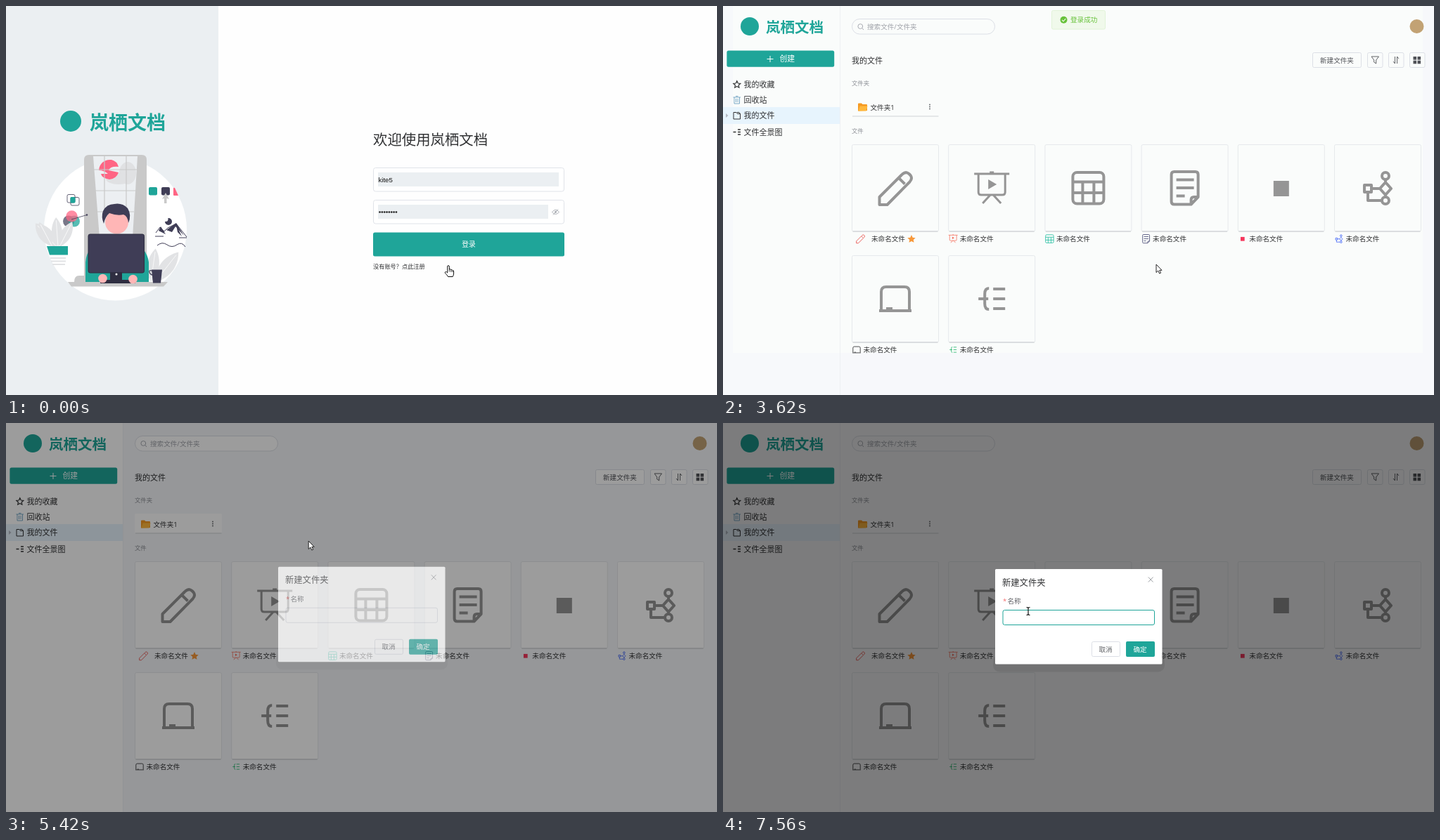
These frames come from a looping animation (1011x554 px, 7.99 s). An HTML page:

```html
<!DOCTYPE html>
<html lang="zh-CN">
<head>
<meta charset="utf-8">
<title>文档</title>
<style>
html, body { margin: 0; width: 100%; height: 100%; overflow: hidden; background: #fff; }
svg { display: block; width: 1011px; height: 554px; }
text { font-family: 'Open Sans', 'Noto Sans CJK SC', 'Noto Sans CJK', sans-serif; white-space: pre; }
.edge { fill: var(--edge); }
.page { fill: var(--page); }
.side { fill: var(--side); }
.card { fill: var(--card); }
</style>
</head>
<body>
<svg id="stage" viewBox="0 0 1011 554" xmlns="http://www.w3.org/2000/svg"></svg>
<script>
const LOOP = 7990;
const TEAL = '#1fa599', INK = '#303133', DARK = '#3f3d56', GREY = '#959595';
const BRAND = '岚栖文档';

// ---- markup helpers ----
const rect = (x, y, w, h, fill, more = '') =>
  `<rect x="${x}" y="${y}" width="${w}" height="${h}" fill="${fill}" ${more}/>`;
const box = (x, y, w, h, fill, line, r = 2) =>
  rect(x, y, w, h, fill, `stroke="${line}" rx="${r}"`);
const disc = (x, y, r, fill, more = '') => `<circle cx="${x}" cy="${y}" r="${r}" fill="${fill}" ${more}/>`;
const shape = (d, fill, more = '') => `<path d="${d}" fill="${fill}" ${more}/>`;
const line = (d, color, w = 1, more = '') =>
  `<path d="${d}" fill="none" stroke="${color}" stroke-width="${w}" ${more}/>`;
// y is the middle of the glyphs
const label = (x, y, s, size, fill = INK, more = '') =>
  `<text x="${x}" y="${y + size * 0.37}" font-size="${size}" fill="${fill}" ${more}>${s}</text>`;

// ---- file type icons, about 48 units wide around 0,0 ----
const GLYPHS = {
  pen: '<path d="M-22.5 24V13L9-18.500Q14.500-24.500 19.500-20L21.500-18Q25-13.500 20.500-8.500L-11.500 24Z M6-13L13.500-5.500"/>',
  slides: '<path stroke-width="3" d="M-25-20H25 M-19-20V6q0 4 4 4H15q4 0 4-4V-20 M-2 10L-13 22 M2 10L13 22 M-3-22H3"/>' +
    '<path stroke="none" fill="currentColor" d="M-5-12L7-5L-5 2Z"/>',
  sheet: '<rect x="-22" y="-22" width="44" height="44.5" rx="6"/><path d="M-22-8.500H22 M-22 7H22 M-8-8V22 M8-8V22"/>',
  doc: '<path d="M-15-23H15q4 0 4 4V13L9 23.500H-15q-4 0-4-4V-19q0-4 4-4Z M9 23V17q0-4 4-4H19 M-12-11.500H13 M-12 0H13 M-12 11.500H0"/>',
  md: '<rect x="-11" y="-10" width="22" height="22" fill="currentColor" stroke="none"/>',
  flow: '<circle cx="11" cy="-17" r="5"/><circle cx="11" cy="18" r="5"/><rect x="-19" y="-4" width="10" height="10"/>' +
    '<path d="M11-8L19 1L11 10L3 1Z M-9 1H3 M-14 6V18H6 M11-12V-8 M11 10V13"/>',
  board: '<path d="M-20 15V-10q0-7 7-7H13q7 0 7 7V15 M-23 17H23 M-13 14H-4"/>',
  mind: '<path d="M-19 0H-5 M-4-15Q-10-15-10-7V7Q-10 15-4 15 M2-14H19 M2 0H19 M2 14H19"/>'
};
const icon = (name, x, y, color, scale = 1, w = 4) =>
  `<g transform="translate(${x} ${y}) scale(${scale})" style="color:${color}" fill="none" stroke="currentColor" stroke-width="${w}" stroke-linejoin="round">${GLYPHS[name]}</g>`;
const small = (name, x, y, color) => icon(name, x, y, color, 0.26, 3.3);

const folder = (x, y) =>
  shape(`M${x - 6.5} ${y + 5.5}V${y - 4.5}q0-1 1-1h4l1.5 1.5h5.5q1 0 1 1v8z`, '#f59a23') +
  shape(`M${x - 6} ${y + 5.5}l2-7h11l-2 7z`, '#ffb83d');
const star = (x, y, r) => Array.from({ length: 10 }, (_, i) => {
  const a = Math.PI * (i / 5 - 0.5), k = i % 2 ? r * 0.48 : r;
  return (i ? 'L' : 'M') + (x + k * Math.cos(a)).toFixed(2) + ' ' + (y + k * Math.sin(a)).toFixed(2);
}).join('') + 'Z';

// ---- login page ----
function leaf(x, y, angle, len, w) {
  return `<g transform="translate(${x} ${y}) rotate(${angle})">` +
    shape(`M0 0C${-w} ${-len * 0.3} ${-w} ${-len * 0.7} 0 ${-len}C${w} ${-len * 0.7} ${w} ${-len * 0.3} 0 0`, '#e2e3e5') +
    line(`M0 0V${-len * 0.9}`, '#fff', 0.7) + '</g>';
}

function artwork() {
  return disc(155.5, 318, 101.5, '#fff') +
    // window and curtains
    shape('M111 393V219q0-7 7-7H193q7 0 7 7V393Z', '#c9c9c9') +
    shape('M124 214H187L180 330H133Z', '#eceff2') +
    '<ellipse cx="173" cy="238" rx="12" ry="16" fill="#e0e1e3"/><ellipse cx="160" cy="246" rx="18" ry="8" fill="#e0e1e3"/>' +
    shape('M132 234C133 223 141 218 150 219Q158 221 160 229Q148 228 146 234L160 237Q157 246 147 247Q136 245 135 239L145 239Q139 234 132 234Z', '#ff6584') +
    line('M140 214V300M171 214V300M125 233H186M127 263H184M129 293H182', '#c9c9c9', 1.2) +
    // design sketches
    line('M89 268.500H96q2 0 2 2V278q0 2-2 2H89q-2 0-2-2V270.500q0-2 2-2Z M94 272.500H102q2 0 2 2V282q0 2-2 2H94q-2 0-2-2V274.500q0-2 2-2Z', DARK, 0.8) +
    rect(91.5, 272, 7, 8.5, TEAL, 'rx="1.5"') +
    disc(89, 306.5, 8, DARK, 'opacity=".7"') + disc(97, 306.5, 8, TEAL, 'opacity=".75"') +
    disc(93.5, 299.5, 8.3, '#ff6584', 'opacity=".75"') +
    line('M93 304L115 297.500', DARK, 0.8) + disc(115, 297.5, 1.2, DARK) +
    rect(203, 258, 12, 11.5, TEAL, 'rx="2"') + rect(221, 258, 12, 11.5, DARK, 'rx="2"') +
    shape('M238 260q0-2 2-1L245 270H239q-1 0-1-1Z', '#ff6584') +
    shape('M227 266L232 275L228.500 274V281H225V274L222 275Z', '#c9c9c9') +
    // mountains
    disc(231, 307, 5, DARK) + disc(227, 303.5, 3.5, '#fff') +
    line('M213 323L219 315L225 321L230 316L242 310L257 329 M212 328H224 M246 330H257', DARK, 1) +
    shape('M217 320L220 314L227 325Z M228 319L242 309L253 327L241 314L236 322Z M242 312L250 328L244 322Z', DARK) +
    line('M215 341Q222 335 229 340T243 340T255 343', DARK, 1) +
    // plants
    leaf(72, 343, -42, 45, 13) + leaf(74, 343, -4, 42, 10) + leaf(76, 343, 27, 40, 10) + leaf(66, 343, -28, 40, 8) +
    shape('M58 342H88V354.500H62Z', TEAL) + line('M63 359H85M64 363.500H85M66 368H84', '#e2e3e5', 2) +
    leaf(206, 393, 8, 48, 11) + leaf(212, 393, 38, 54, 13) +
    // desk and person
    shape('M97 393q0-9 7-9H120V393Z', '#c9c9c9') + shape('M88 393H230L224 399.500H93Z', '#c9c9c9') +
    shape('M113 393V365Q115 340 140 336H176Q200 342 203 365V393Z', TEAL) +
    disc(157.5, 308, 16.5, '#ffb6b6') +
    shape('M139 310Q135 300 138 292Q143 282 154 282Q165 280 173 288Q179 298 174 309Q173 299 167 297Q158 299 147 295Q141 300 139 310Z', DARK) +
    rect(117, 325, 79.5, 55, DARK, 'rx="2.5" stroke="#2f2e41"') +
    rect(148, 379, 17, 13, '#2f2e41') + rect(134, 390, 50, 5, '#2f2e41', 'rx="1"') + disc(157, 382, 1.5, '#fff') +
    disc(137.5, 388, 6.3, '#ffb6b6') + disc(180.5, 389, 6.3, '#ffb6b6') +
    line('M209 378Q203 375 204 379T209 383', DARK, 1.2) + shape('M207 375.500H222L220 394.500H209Z', DARK);
}

function login() {
  const dots = Array.from({ length: 8 }, (_, i) => disc(531.5 + i * 3.35, 293.5, 1.35, '#222')).join('');
  return rect(0, 0, 1011, 554, '#fefefe') + rect(0, 0, 302, 554, '#ebeff2') +
    disc(92, 164, 15, TEAL) + label(119, 166, BRAND, 27, TEAL, 'font-weight="700"') + artwork() +
    label(522, 190.5, '欢迎使用' + BRAND, 20.4) +
    box(522.5, 230.5, 271, 33.5, '#fff', '#e0e3e9', 3) + rect(529, 237, 257, 20, '#ebeff2') +
    label(529.5, 247, 'kite5', 9.6, '#111', 'style="font-family:\'Liberation Sans\',Arial,sans-serif"') +
    box(522.5, 276.5, 271, 33.5, '#fff', '#e0e3e9', 3) + rect(529, 283, 242, 20, '#ebeff2') + dots +
    line('M776.500 293.500Q781.500 287 786.500 293.500Q781.500 299.500 776.500 293.500M778 297.500L785 289.500', '#a8abb2', 0.9) + disc(781.5, 293.3, 1.5, '#a8abb2') +
    rect(522, 322.5, 272, 34, TEAL, 'rx="2.5" id="enter"') +
    label(658, 339.5, '登录', 9.8, '#fff', 'text-anchor="middle"') +
    label(522, 370.5, '没有账号？点此注册', 8.2, INK);
}

// ---- file manager ----
const FILES = [
  ['pen', '#e8504a'], ['slides', '#f5705f'], ['sheet', '#2cc0a4'], ['doc', '#4b4f78'],
  ['md', '#f5365c'], ['flow', '#4a6cf7'], ['board', '#303133'], ['mind', '#2eb872']
];

function fileCard([kind, color], i) {
  const x = 183.5 + 137.2 * (i % 6), y = i < 6 ? 197.5 : 355.5, ty = y + 134, first = i === 0;
  return `<rect class="card" x="${x}" y="${y}" width="123" height="123.5" rx="2" stroke="#e6e9ec"/>` +
    line(`M${x + 1} ${y + 123.5}H${x + 122}`, '#c6c9cc') +
    icon(kind, x + 61.5, y + 61.5, GREY) +
    small(kind, x + (first ? 12 : 6.5), ty, color) + label(x + (first ? 27.5 : 16), ty, '未命名文件', 9.6) +
    (first ? shape(star(268, ty + 0.5, 6), '#f7983a') : '');
}

const sideItem = (y, s, art) => art + label(29.5, y, s, 11);

function home() {
  const tool = x => box(x, 66.5, 21.5, 21, 'var(--card)', '#dcdfe6');
  return '<rect class="edge" width="1011" height="554"/><rect class="page" x="14" width="981" height="494"/>' +
    '<rect class="side" width="166" height="554"/><rect class="card" x="14" width="152" height="494"/>' +
    line('M166.500 0V554', '#eef0f3') +
    disc(38, 29, 13, TEAL) + label(61, 30.5, BRAND, 20.5, TEAL, 'font-weight="700"') +
    rect(5.4, 63.4, 152.8, 23.4, TEAL, 'rx="2.5"') + line('M62.500 75.500H71.500M67 71V80', '#fff') + label(80.5, 75.5, '创建', 10.8, '#fff') +
    rect(0, 144, 166, 24, '#e7f4fd') + shape('M4 153L7.500 156L4 159Z', '#b4bac4') +
    sideItem(112, '我的收藏', line(star(19.8, 112, 5.2), INK, 1.2)) +
    sideItem(134, '回收站', line('M14.500 130H25M16 130V139H23.500V130M18 128.500H21.500M18.500 132V137M21 132V137', '#7aa9c7', 1)) +
    sideItem(156, '我的文件', line('M15 161V151.500H19L20.500 153.500H24.500V161ZM20 151.500H23L24.500 153.500', INK, 1)) +
    sideItem(179.5, '文件全景图', line('M14.500 179.500H18.500M21 176H25M21 179.500H25M21 183H25', INK, 1.6)) +
    box(183.5, 18.5, 203, 21.5, 'var(--card)', '#dcdfe6', 10.75) +
    disc(195.3, 29, 3.4, 'none', 'stroke="#a8abb2"') + line('M197.800 31.500L200 34', '#a8abb2') +
    label(205, 29.5, '搜索文件/文件夹', 9.6, '#a0a3aa') +
    disc(986.5, 29, 10, '#c2a274') +
    label(183, 77.5, '我的文件', 11) +
    box(838.5, 66.5, 69, 21, 'var(--card)', '#dcdfe6') + label(849, 77, '新建文件夹', 9.6, '#505257') +
    tool(916.5) + tool(946.5) + tool(976.5) +
    line('M922 72H932.500L928.700 77V82L925.700 80V77Z', '#606266') +
    line('M955.500 72V82L953 79M958.500 82V72L961 75', '#606266') +
    [[981.5, 72], [987.5, 72], [981.5, 77.7], [987.5, 77.7]].map(p => rect(p[0], p[1], 4.6, 4.6, '#505257')).join('') +
    label(183, 110, '文件夹', 8.4, '#909399') +
    '<rect class="card" x="183" y="129" width="124" height="28" rx="2"/>' + line('M184 157H306.500', '#cfd3d6') +
    folder(198.5, 144) + label(209.5, 144, '文件夹1', 9.6) +
    [140.5, 143.5, 146.5].map(y => disc(294, y, 0.9, '#606266')).join('') +
    label(183, 177.5, '文件', 8.4, '#909399') +
    FILES.map(fileCard).join('');
}

function toast() {
  return box(467.5, 6.5, 76, 26.5, '#f0f9eb', '#e1f3d8') + disc(484.5, 19.8, 5, '#67c23a') +
    line('M482 19.800L484 21.800L487.300 18', '#fff', 1.1) + label(494, 19.8, '登录成功', 9.6, '#67c23a');
}

const MENU = [
  ['', '文件夹', 172], ['board', '白板', 197, '#303133'], ['mind', '思维导图', 218.5, '#2eb872'],
  ['flow', '流程图', 240, '#4a6cf7'], ['md', 'Markdown', 262, '#f5365c'], ['doc', '文档', 283.7, '#5558a0'],
  ['sheet', '电子表格', 305.5, '#2cc0a4'], ['slides', '幻灯片', 327.2, '#f5705f'], ['pen', '笔记', 349, '#e8504a'],
  ['bpmn', 'BPMN', 370.5, '#7cc0f4']
];
function menu() {
  return [7, 5.5, 4, 2.5, 1].map(k => rect(425 - k, 158.5 - k, 108.5 + 2 * k, 226.5 + 2 * k, '#000', `opacity=".012" rx="${k + 2}"`)).join('') +
    rect(425, 157, 108.5, 226.5, '#fff', 'rx="2"') + line('M433.500 183.500H527', '#ebeef2') +
    MENU.map(([kind, s, y, color]) =>
      (!kind ? folder(442.5, y) : kind === 'bpmn' ? disc(442.5, y - 0.5, 6.5, color) : small(kind, 442.5, y, color)) +
      label(453.5, y, s, 9.1)).join('');
}

function dialog() {
  return rect(384, 330, 244, 24.5, '#000', 'opacity=".08" rx="9"') +
    rect(387, 208, 237.5, 135.5, '#fff', 'rx="1.5"') +
    label(397, 227, '新建文件夹', 12.3) + line('M604.800 219.500L611.500 226.500M611.500 219.500L604.800 226.500', '#909399', 0.9) +
    label(398, 253.5, '*', 9.6, '#f56c6c') + label(404.5, 253.5, '名称', 9.6, '#606266') +
    rect(398, 266.5, 215.5, 21, '#fff', 'rx="2.5" id="field"') +
    label(405.5, 277, '', 9.4, '#606266', 'id="typed" style="font-family:\'Liberation Sans\',Arial,sans-serif"') +
    rect(405, 271, 1, 12, INK, 'id="caret"') +
    box(524.5, 311.5, 40, 21, '#fff', '#dcdfe6') + label(534.5, 322, '取消', 9.6, '#606266') +
    rect(573, 311, 41, 22, TEAL, 'rx="2"') + label(583.5, 322, '确定', 9.6, '#fff', 'font-weight="500"');
}

const POINTERS = {
  arrow: shape('M0 0V11.500L2.700 9L4.600 13L6.500 12.200L4.700 8.300H8Z', '#fff', 'stroke="#111" stroke-width=".9"'),
  hand: shape('M-1.300 10V1Q-1.300-.300 0-.300T1.300 1V5Q3.400 4 3.800 5.800Q5.500 5 6 6.600Q7.600 6.300 7.600 8V11Q7.600 13 6.200 15.500H-.500Q-2 12.500-4.500 10.500Q-5.500 8.500-3.500 8.500Q-2.500 8.500-1.300 10Z', '#fff', 'stroke="#111"') +
    line('M1.300 5V8.500M3.800 6V9M6 7V9', '#111', 0.8),
  beam: line('M-2.500-5.500Q0-5.500 0-4Q0-5.500 2.500-5.500M0-4.500V4.500M-2.500 5.500Q0 5.500 0 4Q0 5.500 2.500 5.500', '#111', 1.2)
};

const group = (id, inner) => `<g id="${id}">${inner}</g>`;
const stage = document.getElementById('stage');
stage.innerHTML = group('login', login()) + group('home', home()) + group('toast', toast()) + group('menu', menu()) +
  group('overlay', rect(0, 0, 1011, 554, '#000', 'opacity=".5"') + group('dialog', dialog())) +
  group('pointer', Object.keys(POINTERS).map(k => group(k, POINTERS[k])).join(''));

// ---- motion ----
const el = id => document.getElementById(id);
const show = (id, on) => el(id).setAttribute('display', on ? 'inline' : 'none');
const clamp = v => Math.max(0, Math.min(1, v));

// the CSS "ease" curve
function ease(p) {
  p = clamp(p);
  if (p === 0 || p === 1) return p;
  let lo = 0, hi = 1, u;
  for (let i = 0; i < 20; i++) {
    u = (lo + hi) / 2;
    const x = 0.75 * u * (1 - u) + u * u * u;
    if (x < p) lo = u; else hi = u;
  }
  return 0.3 * u * (1 - u) * (1 - u) + 3 * u * u * (1 - u) + u * u * u;
}

// time, x, y of the pointer's hot spot
const PATH = [
  [40, 629, 370], [250, 638, 362], [470, 638, 362], [810, 664, 346], [2370, 664, 346], [2770, 624, 369],
  [3170, 624, 369], [3260, 616, 368], [3620, 616, 368], [4390, 325, 160], [4420, 325, 160], [4580, 419, 152],
  [4850, 419, 152], [5150, 444, 166], [5330, 444, 166], [5480, 423, 169], [5540, 423, 169], [5950, 434, 268]
];
function hotSpot(t) {
  const i = PATH.findIndex(k => k[0] > t);
  if (i < 0) return PATH[PATH.length - 1].slice(1);
  if (i === 0) return PATH[0].slice(1);
  const [a, ax, ay] = PATH[i - 1], [b, bx, by] = PATH[i];
  let p = (t - a) / (b - a);
  p = p * p * (3 - 2 * p);
  return [ax + (bx - ax) * p, ay + (by - ay) * p];
}

const TYPING = [[0, ''], [6740, 't'], [6860, 'te'], [7010, 'tes'], [7290, 'te'], [7380, 't'], [7470, '']];
const OPEN = 1410, FOCUS = 6090, DIALOG = 5287, SETTLED = 5440;

// edge, page, side and card tones
const TONES = [
  [0, '#f7f8fb', '#fafcfb', '#f7f9fb', '#fafcfb'],
  [DIALOG, '#f5f7fa', '#f5f7fa', '#ffffff', '#ffffff'],
  [SETTLED, '#f9fafb', '#f9fafb', '#f9fafb', '#f9fafb']
];
const latest = (steps, t) => steps.filter(s => s[0] <= t).pop();

function draw(t) {
  const inside = t >= OPEN;
  show('login', !inside);
  show('home', inside);

  const tones = latest(TONES, t);
  ['--edge', '--page', '--side', '--card'].forEach((name, i) => stage.style.setProperty(name, tones[i + 1]));

  const [x, y] = hotSpot(t);
  el('enter').setAttribute('fill', y < 357 ? '#3c9b8f' : TEAL);

  const drop = ease((t - OPEN) / 400) * (1 - ease((t - 4420) / 170));
  show('toast', inside && drop > 0);
  el('toast').setAttribute('opacity', drop);
  el('toast').setAttribute('transform', `translate(0 ${(drop - 1) * 27})`);

  show('menu', t >= 4730 && t < 5275);

  const k = ease((t - DIALOG) / 285);
  show('overlay', k > 0);
  el('overlay').setAttribute('opacity', k);
  el('dialog').setAttribute('opacity', k);
  el('dialog').setAttribute('transform', `translate(0 ${(k - 1) * 14})`);

  el('field').setAttribute('stroke', t >= FOCUS ? TEAL : '#dcdfe6');
  const typed = latest(TYPING, t)[1];
  el('typed').textContent = typed;
  el('caret').setAttribute('x', 405 + (typed ? Math.round(el('typed').getComputedTextLength()) : 0));
  show('caret', (t >= FOCUS && t < 6590) || (t >= 6740 && t < 7560));

  const kind = !inside ? 'hand' : t > 5540 && y > 266 ? 'beam' : 'arrow';
  Object.keys(POINTERS).forEach(name => show(name, name === kind));
  el('pointer').setAttribute('transform', `translate(${x.toFixed(1)} ${y.toFixed(1)})`);
}

const start = performance.now();
function tick() {
  draw((performance.now() - start) % LOOP);
  requestAnimationFrame(tick);
}
tick();
</script>
</body>
</html>
```
